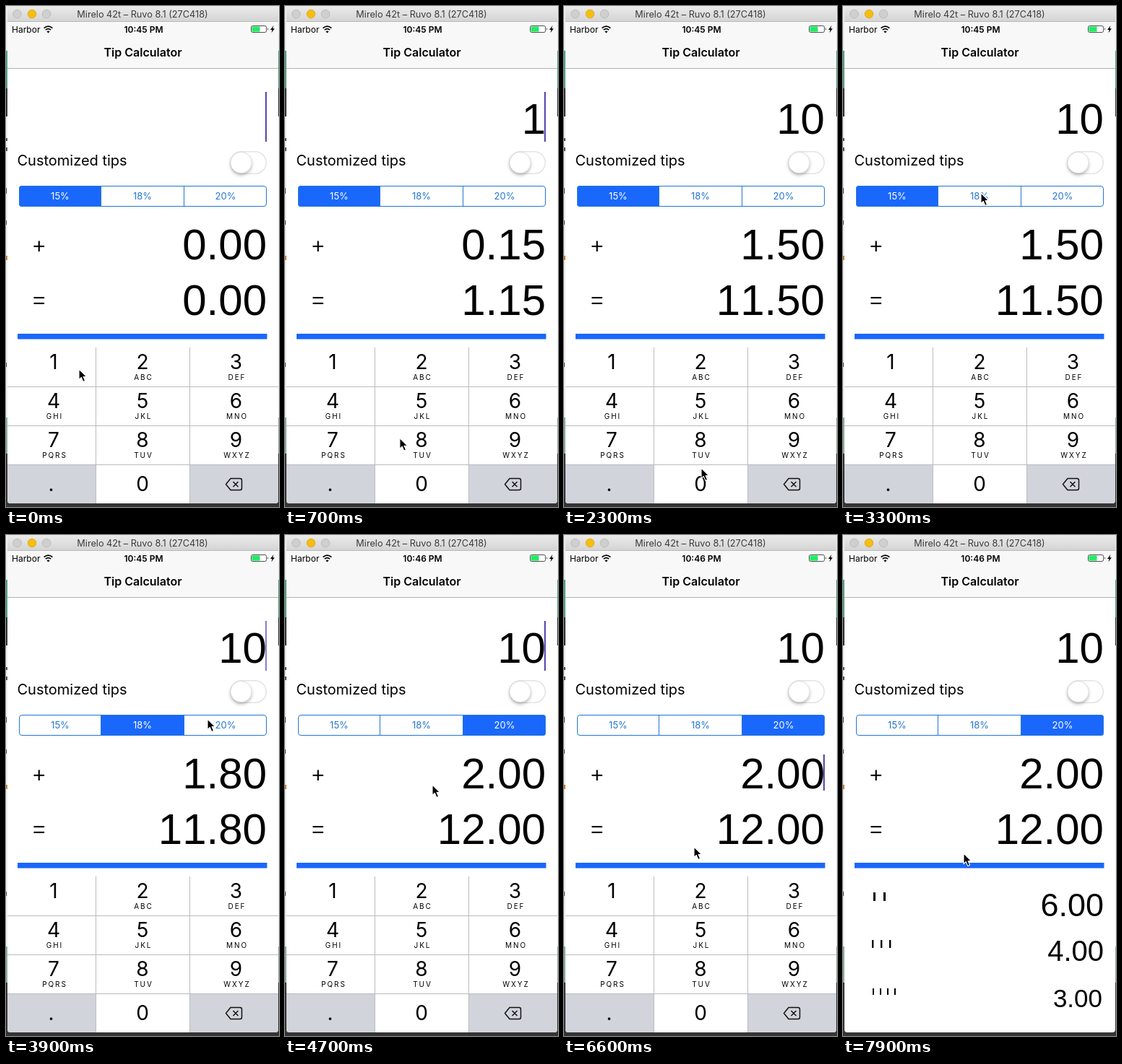
An HTML page for the animation above (8000 ms loop, 378x694 px).

```html
<!DOCTYPE html>
<html lang="en">
<head>
<meta charset="utf-8">
<title>Tip Calculator</title>
<style>
  html, body { margin: 0; width: 100%; height: 100%; overflow: hidden; background: #333; }
  svg { display: block; width: 378px; height: 694px; font-family: Inter, Roboto, sans-serif; }
  .num { font-family: "Liberation Sans", Arial, sans-serif; text-anchor: end; font-kerning: none; }
  .mid { text-anchor: middle; }
  .sub { font-size: 10px; letter-spacing: 1.9px; }
  .key { font-size: 28px; }
</style>
</head>
<body>
<svg id="stage" viewBox="0 0 378 694">
  <defs>
    <linearGradient id="bar" x2="0" y2="1"><stop stop-color="#ebebeb"/><stop offset="1" stop-color="#d3d3d3"/></linearGradient>
    <clipPath id="win"><path d="M2 0H377V685q0 4-4 4H6q-4 0-4-4z"/></clipPath>
    <clipPath id="segClip"><rect x="18" y="249" width="343" height="29" rx="4"/></clipPath>
    <filter id="soft" x="-40%" y="-40%" width="180%" height="190%"><feDropShadow dx="0" dy="2.5" stdDeviation="2" flood-opacity=".28"/></filter>
  </defs>

  <!-- desktop behind the window -->
  <rect width="378" height="694" fill="#efefef"/>
  <path d="M0 62H378V114H0z" fill="#56a182"/>
  <path d="M0 114H378V153H0zM0 620H378V694H0z" fill="#343434"/>
  <path d="M0 570H378V620H0z" fill="#8fae9f"/>
  <path d="M0 183h2v4H0zM0 196h2v5H0zM0 252h1v8H0zM0 297h1v6H0zM0 494h1v6H0z" fill="#555"/>
  <path d="M0 346h2v6H0z" fill="#c98440"/>

  <g clip-path="url(#win)">
    <rect width="378" height="694" fill="#fff"/>
    <rect width="378" height="22" fill="url(#bar)"/>
    <path d="M0 21.5H378" stroke="#b9b9b9"/>
    <g stroke-width=".8">
      <circle cx="15.5" cy="11" r="5.8" fill="#cfcfcf" stroke="#b5b5b5"/>
      <circle cx="36" cy="11" r="5.8" fill="#f5bd10" stroke="#dba514"/>
      <circle cx="56" cy="11" r="5.8" fill="#cfcfcf" stroke="#b5b5b5"/>
    </g>
    <text class="mid" x="189" y="15.5" font-size="12.7" fill="#3c3c3c">Mirelo 42t – Ruvo 8.1 (27C418)</text>

    <rect y="22" width="378" height="64" fill="#f8f8f8"/>
    <path d="M0 86.5H378" stroke="#b4b4b4"/>
    <text x="8" y="37" font-size="12">Harbor</text>
    <g fill="none" stroke="#000" stroke-width="1.7">
      <path d="M52.6 30.6q5.9-5 11.8 0M54.8 33.2q3.7-3 7.4 0"/>
    </g>
    <path d="M56.4 35.2q2.1-1.6 4.2 0L58.5 37.4z"/>
    <text id="clock" class="mid" x="190.5" y="37" font-size="12" font-weight="600"></text>
    <rect x="339.5" y="27.5" width="21" height="9" rx="2" fill="#fff" stroke="#222" stroke-width=".8"/>
    <rect x="340.5" y="28.5" width="11" height="7" fill="#1fec62"/>
    <path d="M362 30.3q1.8 1.7 0 3.4z"/>
    <path d="M370.5 27L366 33h2.6l-1.1 4.2 4.4-6h-2.6z"/>
    <text class="mid" x="189.5" y="70" font-size="16" font-weight="600">Tip Calculator</text>

    <text x="15.5" y="221" font-size="20">Customized tips</text>
    <rect x="310.8" y="201.8" width="49.5" height="30.5" rx="15.2" fill="#fff" stroke="#e3e3e3" stroke-width="1.5"/>
    <circle cx="325.5" cy="217" r="14.6" fill="#fff" stroke="#d2d2d2" stroke-width=".7" filter="url(#soft)"/>

    <g clip-path="url(#segClip)"><rect id="pick" y="249" height="29" fill="#1a67fc"/></g>
    <path d="M131.5 249V278M246.5 249V278" stroke="#2376d2"/>
    <rect x="18.5" y="249.5" width="342" height="28" rx="3.5" fill="none" stroke="#2376d2"/>
    <g id="segs" class="mid" font-size="13"></g>

    <text class="num" x="54.5" y="343" font-size="30">+</text>
    <text class="num" x="54.5" y="418" font-size="30">=</text>
    <text id="bill" class="num" x="361" y="177" font-size="60"></text>
    <text id="tip" class="num" x="361" y="351" font-size="60"></text>
    <text id="total" class="num" x="361" y="428" font-size="60"></text>
    <rect id="caret" x="359" width="2" fill="#5645ac"/>
    <rect x="16" y="454" width="345.5" height="7.5" fill="#1a67fc"/>

    <path d="M42 495h3v12h-3zM56 495h3v12h-3zM40 561h2.4v11H40zM52 561h2.4v11H52zM64 561h2.4v11H64zM41 628h2v9h-2zM51 628h2v9h-2zM61 628h2v9h-2zM71 628h2v9h-2z"/>
    <text class="num" x="361" y="528" font-size="45">6.00</text>
    <text class="num" x="361" y="590" font-size="40">4.00</text>
    <text class="num" x="359" y="654" font-size="35">3.00</text>
    <g id="pad"></g>
  </g>

  <path id="mouse" d="M0 0V14.6L3.3 11.5L5.8 17.4L8.6 16.2L6.1 10.5H10.6z" fill="#000" stroke="#fff" stroke-width="1.1" stroke-linejoin="round"/>
</svg>
<script>
const LOOP = 8000;
const $ = id => document.getElementById(id);
const make = (parent, tag, attrs, text = '') => {
  const el = document.createElementNS('http://www.w3.org/2000/svg', tag);
  for (const k in attrs) el.setAttribute(k, attrs[k]);
  el.textContent = text;
  return parent.appendChild(el);
};

// Number pad
const pad = $('pad'), grey = '#d1d4db';
const colX = [0, 125, 255, 378], midX = [66, 189, 318.5];
const letters = ['', 'ABC', 'DEF', 'GHI', 'JKL', 'MNO', 'PQRS', 'TUV', 'WXYZ'];
const keys = ['1', '2', '3', '4', '5', '6', '7', '8', '9', '.', '0', ''].map((label, i) => {
  const c = i % 3, top = 473 + 54 * Math.floor(i / 3), last = i > 8;
  const box = make(pad, 'rect', { x: colX[c], y: top, width: colX[c + 1] - colX[c], height: 54 });
  box.setAttribute('fill', label === '.' || !label ? grey : '#fff');
  make(pad, 'text', { class: 'key mid', x: label === '.' ? 62.5 : midX[c], y: top + (last ? 37 : 29.5) }, label);
  if (letters[i]) make(pad, 'text', { class: 'sub mid', x: midX[c] + 1.5, y: top + 45 }, letters[i]);
  return box;
});
make(pad, 'path', { d: 'M0 527.5H378M0 581.5H378M0 635.5H378M124.5 473V690M254.5 473V690', stroke: '#b9bbc0' });
make(pad, 'path', {
  d: 'M311 654.5H324q2.5 0 2.5 2.5V668q0 2.5-2.5 2.5H311L304.5 662.5zM314.5 659l7 7M321.5 659l-7 7',
  fill: 'none', stroke: '#111', 'stroke-width': 1.5, 'stroke-linejoin': 'round'
});

// Tip choices
const rates = [15, 18, 20], segX = [18, 132, 247, 361];
const segs = rates.map((r, i) => make($('segs'), 'text', { x: [75, 189, 304][i], y: 268.3 }, r + '%'));

// Pointer stops: time, x, y
const path = [
  [0, 101, 503], [400, 101, 503], [900, 190, 650], [1050, 191, 661], [1500, 191, 661],
  [1800, 190, 640], [2750, 190, 640], [3250, 191, 259], [3600, 191, 259], [3900, 279, 255],
  [4050, 297, 260], [4350, 297, 260], [4700, 204, 346], [5100, 178, 334], [5650, 178, 334],
  [6300, 180, 432], [6600, 180, 432], [6900, 167, 441], [LOOP, 167, 441]
];
const clamp = v => Math.max(0, Math.min(1, v));
const ease = p => p * p * (3 - 2 * p);

function pointer(t) {
  const i = path.findIndex(s => s[0] > t), [t0, x0, y0] = path[i - 1], [t1, x1, y1] = path[i];
  const p = ease((t - t0) / (t1 - t0));
  return [x0 + (x1 - x0) * p, y0 + (y1 - y0) * p];
}

function caretAlpha(t) {
  if (t >= 7150) return 0;
  if (t < 1850) return 1;
  const ph = t % 1000;
  return Math.min(clamp((ph - 350) / 100), clamp((970 - ph) / 100));
}

function draw(t) {
  const bill = t < 300 ? 0 : t < 1200 ? 1 : 10;
  const seg = t < 3500 ? 0 : t < 4250 ? 1 : 2;
  const tip = bill * rates[seg] / 100;
  $('clock').textContent = t < 4200 ? '10:45 PM' : '10:46 PM';
  $('bill').textContent = bill || '';
  $('tip').textContent = tip.toFixed(2);
  $('total').textContent = (bill + tip).toFixed(2);

  $('pick').setAttribute('x', segX[seg]);
  $('pick').setAttribute('width', segX[seg + 1] - segX[seg]);
  segs.forEach((s, i) => s.setAttribute('fill', i === seg ? '#fff' : '#2376d2'));

  const inTip = t >= 5350;
  $('caret').setAttribute('y', inTip ? 304 : 119);
  $('caret').setAttribute('height', inTip ? 50 : 69);
  $('caret').setAttribute('opacity', caretAlpha(t));

  keys[0].setAttribute('fill', t >= 150 && t < 300 ? grey : '#fff');
  keys[10].setAttribute('fill', t >= 1080 && t < 1200 ? grey : '#fff');
  pad.setAttribute('transform', `translate(0 ${218 * ease(clamp((t - 7150) / 350))})`);
  $('mouse').setAttribute('transform', `translate(${pointer(t)})`);
}

const start = performance.now();
function tick() {
  draw((performance.now() - start) % LOOP);
  requestAnimationFrame(tick);
}
tick();
</script>
</body>
</html>
```
